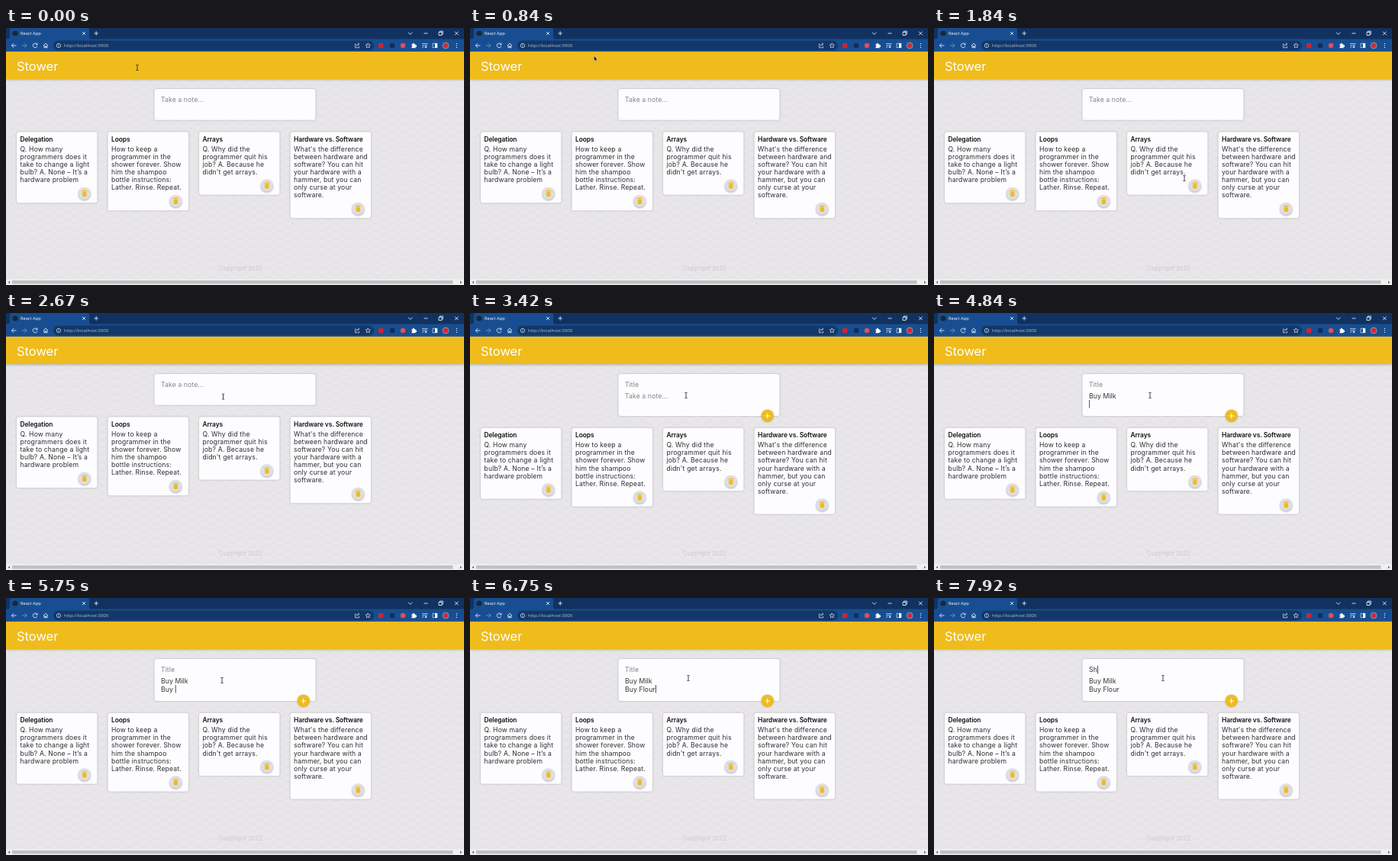
An HTML page for the animation above (8000 ms loop, 600x337 px).

```html
<!DOCTYPE html>
<html lang="en">
<head>
<meta charset="utf-8">
<title>Notes</title>
<style>
  html, body { margin: 0; width: 100%; height: 100%; overflow: hidden; }
  svg { display: block; width: 100vw; height: 100vh; }
  text { font-family: Inter, sans-serif; white-space: pre; }
  .brand { font-size: 16.5px; fill: #fff; }
  .ui { font-family: "Open Sans", sans-serif; font-size: 5.7px; fill: #fff; }
  .url { font-size: 6px; fill: #b9c6d8; }
  .heading { font-size: 8.4px; font-weight: 600; letter-spacing: -.07px; fill: #111; }
  .body { font-size: 8.6px; letter-spacing: .17px; fill: #2c2c30; }
  .field { font-size: 8.7px; letter-spacing: .08px; fill: #333; }
  .hint { fill: #858585; }
  .footer { font-size: 7.6px; letter-spacing: .05px; fill: #cbc9cc; }
  .paper { fill: #fdfcfe; filter: drop-shadow(0 .8px 1.2px #aaa8ac); }
  .round { fill: #dfdde0; filter: drop-shadow(0 1px 1.2px #aaa); }
  .line { fill: none; stroke: #e4ebf4; stroke-width: .9; }
  .gold { fill: #efbc1b; }
</style>
</head>
<body>
<svg viewBox="0 0 600 337" preserveAspectRatio="none">
  <defs>
    <pattern id="waves" width="18" height="10" patternUnits="userSpaceOnUse">
      <path d="M0 5Q9-3 18 5M0 8Q9 0 18 8M-9 10Q0 2 9 10Q18 2 27 10M-9 3Q0-5 9 3Q18-5 27 3"
        fill="none" stroke="#dfdde0" stroke-width=".6"/>
    </pattern>
    <g id="bin" class="gold">
      <path d="M-2.6-2.2H2.6V3.2Q2.6 4 1.8 4H-1.8Q-2.6 4-2.6 3.2ZM-3.3-3.9H-1.4L-.9-4.4H.9L1.4-3.9H3.3V-2.9H-3.3Z"/>
    </g>
  </defs>

  <rect width="600" height="337" fill="#e9e7e9"/>
  <rect y="67" width="600" height="263" fill="url(#waves)"/>

  <g id="browser">
    <rect width="600" height="15" fill="#113260"/>
    <path d="M3 14.5Q5 14 5 12V3Q5 0 8 0H106Q109 0 109 3V12Q109 14 111 14.5H600V31H0V14.5Z" fill="#184e91"/>
    <rect x="62" y="16.5" width="420" height="13" rx="6.5" fill="#123768"/>
    <circle cx="12" cy="7" r="3.6" fill="#20262e"/>
    <text class="ui" x="19" y="9.4">React App</text>
    <text class="ui url" x="76" y="25.2">http://localhost:3000</text>
    <path class="line" d="M100 5l4 4m0-4l-4 4M115.5 7h5.4m-2.7-2.7v5.4M527 5.8l2.7 2.6l2.7-2.6M547.5 7h5M567 5.5h4v4h-4zM568.3 5.3v-1.2h4v4h-1.2M588 4.7l4.6 4.6m0-4.6l-4.6 4.6"/>
    <path class="line" d="M13.5 23H7.3m2.8-2.8L7.3 23l2.8 2.8M40.6 21.3a2.9 2.9 0 1 0 .4 2.4M41 19.7v2.2h-2.3M49 23l3-3l3 3M50 22.6v3.3h1.3v-2h1.4v2H54v-3.3"/>
    <path class="line" stroke-opacity=".45" d="M21 23h6.2m-2.8-2.8l2.8 2.8l-2.8 2.8"/>
    <g class="line" style="stroke-width:.7">
      <circle cx="69" cy="23" r="2.7"/>
      <path d="M69 22.5v2M69 21.1v.7M459 21h-1.6v4.8h5.2v-2M459.3 24q.3-3 3.2-3m-1.3-1.5l1.6 1.5l-1.6 1.5"/>
      <path d="M474.2 19.8l.9 2.1l2.3.2l-1.7 1.5l.5 2.3l-2-1.2l-2 1.2l.5-2.3l-1.7-1.5l2.3-.2z"/>
      <path d="M545 20.5h5M545 22.7h5M545 25h2.7M550.8 25v-4.5h1.7M559 20.3h5.8v5.4H559z"/>
    </g>
    <rect x="562" y="20" width="3" height="6" fill="#fff"/>
    <circle cx="550" cy="25" r="1.1" fill="#fff"/>
    <rect x="488" y="20" width="6.3" height="6.3" rx="1" fill="#cf2433"/>
    <rect x="503" y="20" width="6" height="6" rx="1" fill="#152b5c"/>
    <circle cx="520" cy="23" r="3.3" fill="#d8505a"/>
    <path d="M531.3 21.2h1.6a1.1 1.1 0 1 1 2 0h1.6v1.6a1.1 1.1 0 1 1 0 2v1.5h-5.2v-1.5a1 1 0 1 0 0-2z" fill="#fff"/>
    <circle cx="576" cy="23" r="4" fill="#d12b37" stroke="#8294a5" stroke-width="1"/>
    <path d="M590.4 20v.9m0 1.6v.9m0 1.6v.9" stroke="#fff" stroke-width="1.1"/>
  </g>

  <rect class="gold" y="31" width="600" height="36" style="filter:drop-shadow(0 1px 1.5px #aaa)"/>
  <text class="brand" x="14" y="55.5">Stower</text>

  <rect id="form" class="paper" x="194.5" y="80" width="211" rx="3"/>
  <text id="title" class="field" x="203"></text>
  <text id="first" class="field" x="203"></text>
  <text id="second" class="field" x="203" y="122.8"></text>
  <rect id="caret" width=".8" height="10.5" fill="#222"/>
  <g id="add">
    <circle class="gold" r="8" style="filter:drop-shadow(0 .8px 1px #aaa)"/>
    <path d="M-3.2 0H3.2M0-3.2V3.2" stroke="#fff" stroke-width="1.1"/>
  </g>

  <g id="cards"></g>
  <text class="footer" x="279" y="318.3">Copyright 2022</text>

  <rect y="329.7" width="600" height="7.3" fill="#f0f0f0"/>
  <rect x="8" y="331" width="577.5" height="4.6" fill="#c1c1c1"/>
  <path d="M5 331.6v3.6L2.8 333.4zM595 331.6v3.6l2.2-1.8z" fill="#606060"/>

  <path id="arrow" d="M0 0V6.4L1.5 5L2.5 7.2L3.5 6.7L2.5 4.6H4.5Z" fill="#111" stroke="#fff" stroke-width=".35"/>
  <path id="beam" d="M-1.6-3.5H-.5L0-3.1L.5-3.5H1.6M0-3.1V3.1M-1.6 3.5H-.5L0 3.1L.5 3.5H1.6" fill="none" stroke="#222" stroke-width=".85"/>
</svg>
<script>
const LOOP = 8000, STEP = 1000 / 12;
const OPEN = 2850, TITLE_FOCUS = 7250, BLINK = 530;
const $ = id => document.getElementById(id);

const notes = [
  ["Delegation", 93, "Q. How many|programmers does it|take to change a light|bulb? A. None – It’s a|hardware problem"],
  ["Loops", 103, "How to keep a|programmer in the|shower forever. Show|him the shampoo|bottle instructions:|Lather. Rinse. Repeat."],
  ["Arrays", 82.5, "Q. Why did the|programmer quit his|job? A. Because he|didn't get arrays."],
  ["Hardware vs. Software", 113, "What's the difference|between hardware and|software? You can hit|your hardware with a|hammer, but you can|only curse at your|software."]
];

$("cards").innerHTML = notes.map(([heading, height, body], i) => `
  <g transform="translate(${14 + i * 119.5} 136.3)">
    <rect class="paper" width="105.5" height="${height}" rx="3"/>
    <text class="heading" x="4.5" y="12.7">${heading}</text>
    ${body.split("|").map((line, row) =>
      `<text class="body" x="4.5" y="${25.3 + row * 10.15}">${line}</text>`).join("")}
    <g transform="translate(88.8 ${height - 12.3})">
      <circle class="round" r="8"/><use href="#bin"/>
    </g>
  </g>`).join("");

// time, x, y, pointer shape
const path = [
  [0, 172, 52, "beam"], [250, 172, 52, "beam"], [500, 167, 44, "arrow"],
  [830, 162.5, 36.7, "arrow"], [1000, 165, 42, "arrow"], [1400, 255, 128, "arrow"],
  [1600, 310, 185, "beam"], [1830, 328, 197, "beam"], [2050, 328, 197, "beam"],
  [2350, 304, 145, "arrow"], [2420, 298, 128, "arrow"], [2500, 292, 118, "beam"],
  [2700, 283, 108, "beam"], [5900, 283, 108, "beam"], [6300, 286, 105, "beam"],
  [6800, 286, 105, "beam"], [7150, 292, 95, "beam"], [7300, 292, 95, "beam"],
  [7600, 300, 105, "beam"], [8000, 300, 105, "beam"]
];

// text, time of first key, time between keys
const typing = {
  first: ["Buy Milk", 3750, 125],
  second: ["\nBuy Flour", 4800, 0],
  title: ["Sh", 7590, 240]
};
const keyTimes = {
  first: [...typing.first[0]].map((_, i) => 3750 + i * 125),
  second: [4800, ...Array.from({ length: 9 }, (_, i) => 5300 + i * 150)],
  title: [7590, 7830]
};

const typed = (field, t) =>
  typing[field][0].slice(0, keyTimes[field].filter(k => k <= t).length);

const show = (id, on) => $(id).setAttribute("visibility", on ? "visible" : "hidden");

function setField(id, value, hint, y) {
  const el = $(id);
  el.textContent = value || hint;
  el.classList.toggle("hint", !value);
  el.setAttribute("y", y);
}

function drawPointer(t) {
  const i = path.findLastIndex(p => p[0] <= t);
  const [t0, x0, y0, shape] = path[i];
  const [t1, x1, y1] = path[i + 1] || [LOOP + 1, x0, y0];
  const u = (t - t0) / (t1 - t0), x = x0 + (x1 - x0) * u, y = y0 + (y1 - y0) * u;
  for (const id of ["arrow", "beam"]) {
    show(id, id === shape);
    $(id).setAttribute("transform", `translate(${x} ${y})`);
  }
}

function drawForm(t) {
  const open = t >= OPEN;
  const title = typed("title", t), first = typed("first", t), second = typed("second", t);
  $("form").setAttribute("height", open ? 55 : 40.7);
  $("cards").setAttribute("transform", `translate(0 ${open ? 14.5 : 0})`);
  const zoom = Math.min(1, Math.max(0, (t - OPEN) / 225));
  $("add").setAttribute("transform", `translate(389.7 135) scale(${1 - (1 - zoom) ** 3})`);

  setField("title", title, open ? "Title" : "", 97.2);
  setField("first", first, "Take a note...", open ? 111.7 : 97.2);
  $("second").textContent = second.slice(1);

  const inTitle = t >= TITLE_FOCUS;
  const [field, value, y] = inTitle ? ["title", title, 88.8]
    : second ? ["second", second.slice(1), 114] : ["first", first, 103];
  const events = [OPEN, TITLE_FOCUS, ...Object.values(keyTimes).flat()];
  const last = Math.max(...events.filter(e => e <= t));
  show("caret", open && Math.floor((t - last) / BLINK) % 2 === 0);
  $("caret").setAttribute("x", 203.3 + (value ? $(field).getComputedTextLength() : 0));
  $("caret").setAttribute("y", y);
}

function frame() {
  const t = Math.floor((performance.now() % LOOP + 2) / STEP) * STEP;
  drawPointer(t);
  drawForm(t);
  requestAnimationFrame(frame);
}
frame();
</script>
</body>
</html>
```
